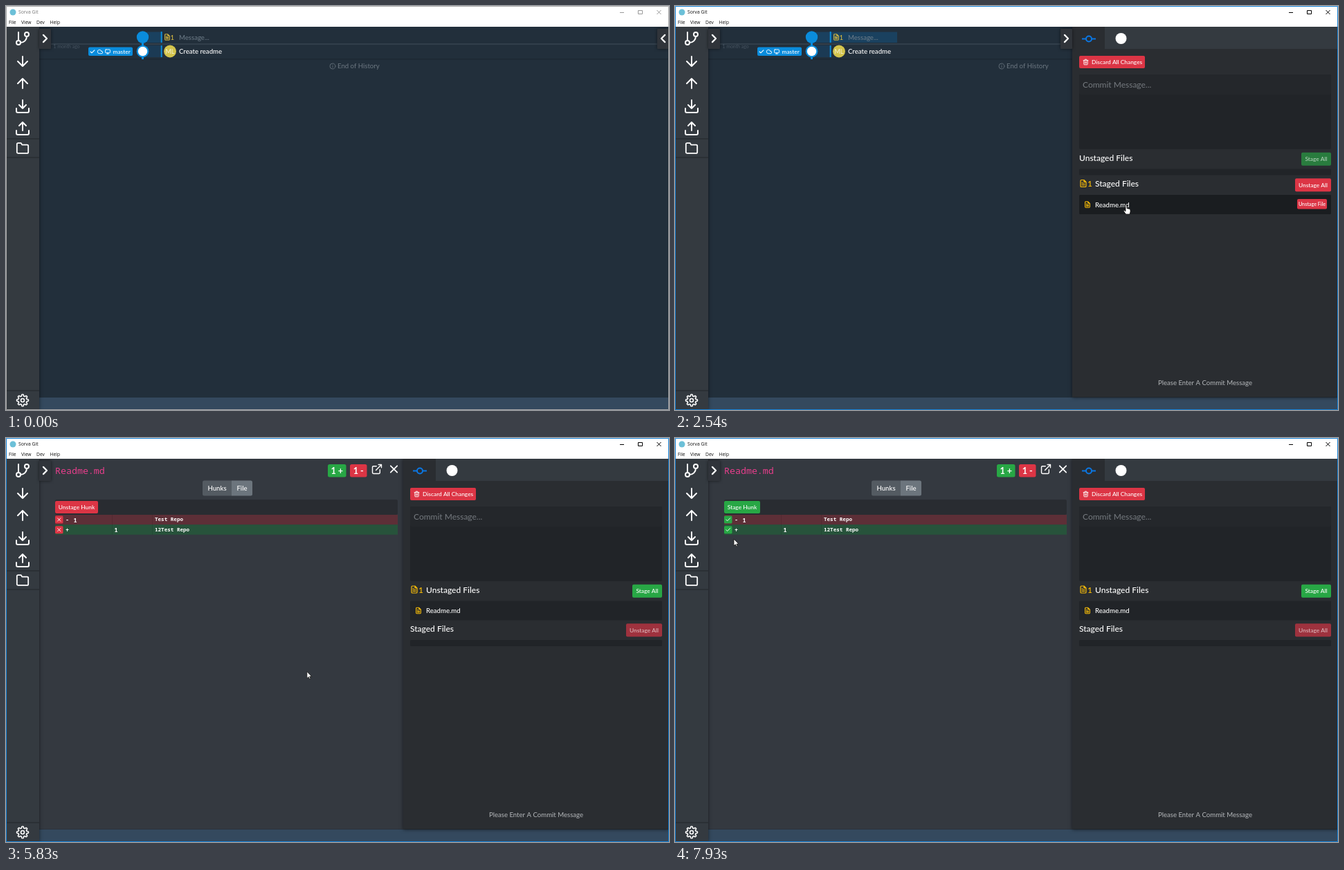
These frames come from a looping animation (958x584 px, 8 s). An HTML page with a canvas:

```html
<!DOCTYPE html>
<html lang="en">
<head>
<meta charset="utf-8">
<title>Sorva Git</title>
<style>
html, body { margin: 0; width: 100%; height: 100%; overflow: hidden; background: #222f3b; }
canvas { display: block; }
</style>
</head>
<body>
<canvas id="stage" width="958" height="584"></canvas>
<script>
const ctx = document.getElementById('stage').getContext('2d');
const LOOP = 8000;
const SANS = 'Lato, sans-serif', MENU = '"Open Sans", sans-serif', MONO = '"Noto Sans Mono", monospace';
const C = {
  side: '#343a40', pane: '#2a2d31', well: '#212428', history: '#222f3b', status: '#34495e',
  blue: '#0a8cdc', red: '#dc3545', green: '#28a745', amber: '#ffc107', white: '#fff'
};

// Line icons on a 24 unit grid
const ICONS = {
  branch: 'M6 3v12M21 6a3 3 0 1 1-6 0a3 3 0 1 1 6 0M9 18a3 3 0 1 1-6 0a3 3 0 1 1 6 0M18 9a9 9 0 0 1-9 9',
  down: 'M12 5v14M19 12l-7 7-7-7',
  up: 'M12 19V5M5 12l7-7 7 7',
  pull: 'M21 15v4a2 2 0 0 1-2 2H5a2 2 0 0 1-2-2v-4M7 10l5 5 5-5M12 15V3',
  push: 'M21 15v4a2 2 0 0 1-2 2H5a2 2 0 0 1-2-2v-4M17 8l-5-5-5 5M12 3v12',
  folder: 'M22 19a2 2 0 0 1-2 2H4a2 2 0 0 1-2-2V5a2 2 0 0 1 2-2h5l2 3h9a2 2 0 0 1 2 2z',
  open: 'M18 13v6a2 2 0 0 1-2 2H5a2 2 0 0 1-2-2V8a2 2 0 0 1 2-2h6M15 3h6v6M10 14L21 3',
  file: 'M14 2H6a2 2 0 0 0-2 2v16a2 2 0 0 0 2 2h12a2 2 0 0 0 2-2V8zM14 2v6h6M16 13H8M16 17H8M10 9H8',
  cloud: 'M18 10h-1.26A8 8 0 1 0 9 20h9a5 5 0 0 0 0-10z',
  monitor: 'M4 3h16a2 2 0 0 1 2 2v10a2 2 0 0 1-2 2H4a2 2 0 0 1-2-2V5a2 2 0 0 1 2-2zM8 21h8M12 17v4',
  check: 'M20 6L9 17l-5-5',
  cross: 'M18 6L6 18M6 6l12 12',
  trash: 'M3 6h18M19 6v14a2 2 0 0 1-2 2H7a2 2 0 0 1-2-2V6M8 6V4a2 2 0 0 1 2-2h4a2 2 0 0 1 2 2v2M10 11v6M14 11v6',
  info: 'M22 12a10 10 0 1 1-20 0a10 10 0 1 1 20 0M12 16v-4M12 8h.01',
  left: 'M15 18l-6-6 6-6',
  right: 'M9 18l6-6-6-6'
};
const paths = Object.fromEntries(Object.entries(ICONS).map(([k, d]) => [k, new Path2D(d)]));
const ARROW = new Path2D('M0 0V9.8L2.3 7.8L3.8 11L5.3 10.4L3.9 7.2H7z');
const HAND = new Path2D('M-1 1a1 1 0 0 1 2 0V4.5L4.5 5.3Q6 5.7 6 7V9.5L5 13H-.5L-3.6 8.6Q-4 7.2-2.6 7.4L-1 8.8z');

// Pointer route: time, x, y
const ROUTE = [
  [120, 868, 554], [480, 520, 310], [740, 140, 72], [880, 200, 46], [1010, 219, 39],
  [1770, 219, 39], [2150, 430, 170], [2440, 645, 285], [2540, 652, 288], [2640, 652, 288],
  [3060, 562, 333], [3380, 124, 186], [3600, 118, 130], [3810, 112, 100],
  [5430, 112, 100], [5720, 330, 300], [5900, 500, 361], [6080, 610, 300], [6210, 627, 247],
  [6280, 627, 247], [6420, 632, 248], [7110, 632, 248], [7400, 420, 190],
  [7700, 130, 120], [7890, 84.5, 133], [7930, 85, 146]
];

const within = (t, a, b) => t >= a && t < b;

function spring(t, start, speed) {
  const u = Math.max(0, t - start) / 1000 * speed;
  return 1 - (1 + u) * Math.exp(-u);
}

function rect(x, y, w, h, color, r = 0) {
  ctx.fillStyle = color;
  ctx.beginPath();
  ctx.roundRect(x, y, w, h, r);
  ctx.fill();
}

function disc(x, y, r, color) {
  ctx.fillStyle = color;
  ctx.beginPath();
  ctx.arc(x, y, r, 0, 7);
  ctx.fill();
}

function text(str, x, y, size, color = C.white, { font = SANS, weight = 500, align = 'left' } = {}) {
  ctx.font = `${weight} ${size}px ${font}`;
  ctx.textAlign = align;
  ctx.fillStyle = color;
  ctx.fillText(str, x, y + size * 0.35);
}

function icon(name, x, y, scale, color = C.white, width = 2) {
  ctx.save();
  ctx.translate(x, y);
  ctx.scale(scale, scale);
  ctx.translate(-12, -12);
  ctx.strokeStyle = color;
  ctx.lineWidth = width;
  ctx.lineCap = ctx.lineJoin = 'round';
  ctx.stroke(paths[name]);
  ctx.restore();
}

function button(label, x, y, w, h, color, size = 8.4, disabled = false) {
  ctx.save();
  if (disabled) ctx.globalAlpha *= 0.65;
  rect(x, y, w, h, color, 2);
  text(label, x + w / 2, y + h / 2, size, C.white, { align: 'center' });
  ctx.restore();
}

function shaded(blur, draw) {
  ctx.save();
  ctx.shadowColor = 'rgba(0,0,0,.55)';
  ctx.shadowBlur = blur;
  draw();
  ctx.restore();
}

function gear(x, y) {
  ctx.strokeStyle = C.white;
  ctx.lineWidth = 1.6;
  ctx.lineJoin = 'round';
  ctx.beginPath();
  for (let i = 0; i < 96; i++) {
    const a = i / 96 * Math.PI * 2;
    const r = 7.3 + 1.2 * Math.tanh(2.5 * Math.cos(8 * a));
    ctx.lineTo(x + r * Math.cos(a), y + r * Math.sin(a));
  }
  ctx.closePath();
  ctx.stroke();
  ctx.beginPath();
  ctx.arc(x, y, 2.5, 0, 7);
  ctx.stroke();
}

function titleBar(active) {
  const ink = active ? '#000' : '#999';
  rect(0, 0, 958, 30, C.white);
  disc(10, 9, 4.5, '#6cc0d8');
  text('Sorva Git', 18, 9, 6.8, active ? '#111' : '#777', { font: MENU, weight: 400 });
  [['File', 4], ['View', 22], ['Dev', 44], ['Help', 63.5]].forEach(([s, x]) =>
    text(s, x, 24, 6.7, '#111', { font: MENU, weight: 400 }));
  ctx.strokeStyle = ink;
  ctx.lineWidth = 1;
  ctx.strokeRect(913.5, 6.5, 6, 5);
  ctx.beginPath();
  ctx.moveTo(887, 9.5); ctx.lineTo(893, 9.5);
  ctx.moveTo(940.5, 6); ctx.lineTo(946.5, 12);
  ctx.moveTo(946.5, 6); ctx.lineTo(940.5, 12);
  ctx.stroke();
}

function sidebar() {
  shaded(5, () => rect(0, 30, 48, 554, C.side));
  [['branch', 47], ['down', 80], ['up', 112], ['pull', 145], ['push', 177]].forEach(([n, y]) => icon(n, 24, y, 1));
  icon('folder', 24, 205.5, 0.82, C.white, 2.2);
  gear(24, 570);
  [192, 219, 556].forEach(y => rect(0, y - 0.5, 48, 1, '#22262a'));
}

function history(selected) {
  rect(48, 30, 910, 536, C.history);
  rect(48, 566, 910, 18, C.status);
  rect(65, 54.5, 893, 1, '#43505c');
  rect(48, 76, 910, 1.5, '#1d2833');

  const trail = '#1a415f';
  rect(203, 37.5, selected ? 118 : 21, 15.5, trail);
  rect(203, 57, 21, 17, '#1b3a54');
  rect(223.7, 37, 2, 16, C.blue);
  rect(223.7, 57, 2, 17, C.blue);
  rect(196, 45, 3, 32, C.blue);
  disc(197.5, 45, 8.7, C.blue);
  disc(197.5, 65.5, 8.9, C.blue);
  disc(197.5, 65.5, 6.7, C.white);

  icon('file', 233, 45, 0.42, '#d9bb40', 2.6);
  text('1', 237.5, 45.5, 9.6, '#d9bb40');
  text('Message...', 250, 45.5, 9.6, '#6f7e8a', { weight: 400 });

  text('1 month ago', 68.5, 59, 6.9, '#465360', { weight: 400 });
  rect(119, 59.5, 64, 12.5, C.blue, 2);
  icon('check', 125, 66, 0.36, C.white, 3);
  icon('cloud', 136, 66, 0.34, C.white, 2.6);
  icon('monitor', 147, 66, 0.34, C.white, 2.6);
  text('master', 154.5, 65.7, 8.4);
  disc(237, 65.5, 9, '#d3c44c');
  text('ML', 237, 65.5, 9, '#f4f1dc', { align: 'center', weight: 400 });
  text('Create readme', 250, 66, 9.6);

  icon('info', 472, 87, 0.4, '#6d7882');
  text('End of History', 479, 87, 9.6, '#6d7882', { weight: 400 });
}

function tab(x, dir) {
  shaded(4, () => rect(x, 33, 17, 29, '#30343a', 1));
  icon(dir, x + 8.5, 47, 0.85, C.white, 2.6);
}

// shut: how far the left edge is from its open place
function diffPane(shut, staged, titled) {
  const k = Math.min(1, shut / 18);
  const dx = shut + 39 * k;
  const left = 48 + shut;
  ctx.save();
  ctx.globalAlpha = 1 - shut / 526;
  ctx.beginPath();
  ctx.rect(left, 30, 526 - shut, 536);
  ctx.clip();
  rect(left, 30, 526 - shut, 535.5, '#343940');
  ctx.translate(0, -k);

  if (titled) text('Readme.md', 71 + dx, 47.5, 13.3, '#e83e8c', { font: MONO, weight: 400 });
  [['1 +', 465, 26.5, C.green], ['1 -', 497, 24.5, C.red]].forEach(([s, x, w, color]) => {
    rect(x + k, 38, w, 18.5, color, 2.5);
    text(s, x + k + w / 2, 47.5, 12.6, C.white, { weight: 700, align: 'center' });
  });
  icon('open', 536 + k, 45, 0.72);
  icon('cross', 560.5 + k, 45, 0.78, C.white, 2.3);

  const mid = 284 + dx / 2;
  rect(mid, 61.5, 42, 22, '#545b62', [2.5, 0, 0, 2.5]);
  rect(mid + 42, 61.5, 30, 22, '#6c757d', [0, 2.5, 2.5, 0]);
  text('Hunks', mid + 21, 72.5, 9.6, C.white, { align: 'center' });
  text('File', mid + 57, 72.5, 9.6, C.white, { align: 'center' });

  const x = 71 + dx, w = 495 - dx;
  if (w > 0) {
    rect(x, 89, w, 22, '#292c31', 2);
    rect(x, 111, w, 14.3, '#5d2f37');
    rect(x, 125.3, w, 14.5, '#27533b');
  }
  const color = staged ? C.red : C.green;
  button(staged ? 'Unstage Hunk' : 'Stage Hunk', x, 91, staged ? 62 : 52, 18, color);
  [118, 132.7].forEach(y => {
    rect(x, y - 5.5, 11.5, 11, color, 1.5);
    icon(staged ? 'cross' : 'check', x + 5.7, y, 0.36, C.white, 2.6);
  });
  const mono = (s, px, y, size) => text(s, x + px, y, size, C.white, { font: MONO, weight: 600 });
  mono('-', 15, 118.5, 8.5);
  mono('+', 15, 133, 8.5);
  mono('1', 26.5, 118.5, 8.6);
  mono('1', 85.5, 133, 8.6);
  mono('Test Repo', 144, 117.5, 7.6);
  mono('12Test Repo', 144, 132, 7.6);
  rect(x + 82, 111, 0.5, 29, 'rgba(0,0,0,.2)');
  rect(x + 140, 111, 0.5, 29, 'rgba(0,0,0,.2)');
  ctx.restore();
}

function fileGroup(name, y, full, hover, verb, color) {
  if (full) {
    icon('file', 590, y - 0.5, 0.5, C.amber, 2.3);
    text('1', 596, y, 12, C.amber);
  }
  text(name, full ? 607 : 584, y, 12);
  const w = verb === 'Stage' ? 43 : 52;
  button(verb + ' All', 948 - w, y - 7.7, w, 19, color, 8.4, !full);
  rect(584, y + 16, 364, full ? 28 : 9, hover ? '#1a1d20' : C.well, 1.5);
  if (!full) return;
  icon('file', 596, y + 30, 0.42, C.amber, 2.5);
  text('Readme.md', 607, y + 30.5, 9.6);
  const bw = verb === 'Stage' ? 34 : 43;
  if (hover) button(verb + ' File', 942 - bw, y + 22, bw, 14.5, color, 7.2);
}

function commitPane(x, staged, hover) {
  ctx.save();
  ctx.translate(x - 574, 0);
  shaded(5, () => rect(574, 30, 384, 535.5, C.pane));
  rect(621, 30, 337, 32, C.side);
  ctx.strokeStyle = '#0b77e3';
  ctx.lineWidth = 2;
  ctx.beginPath();
  ctx.moveTo(588, 47.5); ctx.lineTo(594, 47.5);
  ctx.moveTo(602, 47.5); ctx.lineTo(608, 47.5);
  ctx.moveTo(602, 47.5);
  ctx.arc(598, 47.5, 4, 0, Math.PI * 2);
  ctx.stroke();
  disc(644.5, 47, 8, C.white);

  rect(584, 72, 95, 18, C.red, 2);
  icon('trash', 593.5, 81, 0.38, C.white, 2.5);
  text('Discard All Changes', 602, 81.2, 8.4);
  rect(584, 99, 364, 108, C.well, 2);
  rect(584, 99, 364, 29, '#24272b', 2);
  text('Commit Message...', 589, 114, 12, '#757a7f', { weight: 400 });

  fileGroup('Unstaged Files', 219.5, !staged, !staged && hover, 'Stage', C.green);
  fileGroup('Staged Files', staged ? 257 : 276, staged, staged && hover, 'Unstage', C.red);
  text('Please Enter A Commit Message', 766, 545, 9.6, '#b4b7ba', { align: 'center', weight: 400 });
  ctx.restore();
}

function pointer(t) {
  if (t < ROUTE[0][0]) return;
  let i = ROUTE.findIndex(p => p[0] > t);
  if (i < 0) i = ROUTE.length - 1;
  const [t0, x0, y0] = ROUTE[i - 1], [t1, x1, y1] = ROUTE[i];
  const k = Math.min(1, (t - t0) / (t1 - t0));
  const hand = within(t, 860, 1830) || within(t, 2440, 2680) || within(t, 3740, 5480) || within(t, 6150, 7160);
  const shape = hand ? HAND : ARROW;
  ctx.save();
  ctx.translate(x0 + (x1 - x0) * k, y0 + (y1 - y0) * k);
  ctx.strokeStyle = '#111';
  ctx.lineWidth = 0.8;
  ctx.fillStyle = C.white;
  ctx.fill(shape);
  ctx.stroke(shape);
  ctx.restore();
}

function diffShut(t) {
  if (t < 2620 || within(t, 6920, 7110)) return null;
  let part = 1 - spring(t, 2620, 18);
  if (t >= 6584) part = spring(t, 6584, 18);
  if (t >= 7110) part = 1 - spring(t, 7110, 13);
  const px = Math.round(526 * part);
  return px < 3 ? 0 : px;
}

function draw(t) {
  const active = t >= 1010;
  const staged = t < 4560;
  const slide = spring(t, 1247, 13);
  const paneX = Math.round(958 - 384 * slide);
  const hover = within(t, 2440, 2700) || within(t, 6150, 7200);

  history(t >= 860);
  const shut = diffShut(t);
  if (shut !== null) diffPane(shut, t < 7000, !within(t, 6584, 7110));
  sidebar();
  tab(48, 'right');
  if (slide > 0) commitPane(paneX, staged, hover);
  if (shut === null || shut > 500) tab(paneX - 17, slide > 0 ? 'right' : 'left');
  titleBar(active);
  ctx.strokeStyle = active ? '#1883d7' : '#aaa';
  ctx.lineWidth = 1;
  ctx.strokeRect(0.5, 0.5, 957, 583);
  pointer(t);
}

const begin = performance.now();
function tick() {
  draw((performance.now() - begin) % LOOP);
  requestAnimationFrame(tick);
}
tick();
</script>
</body>
</html>
```
